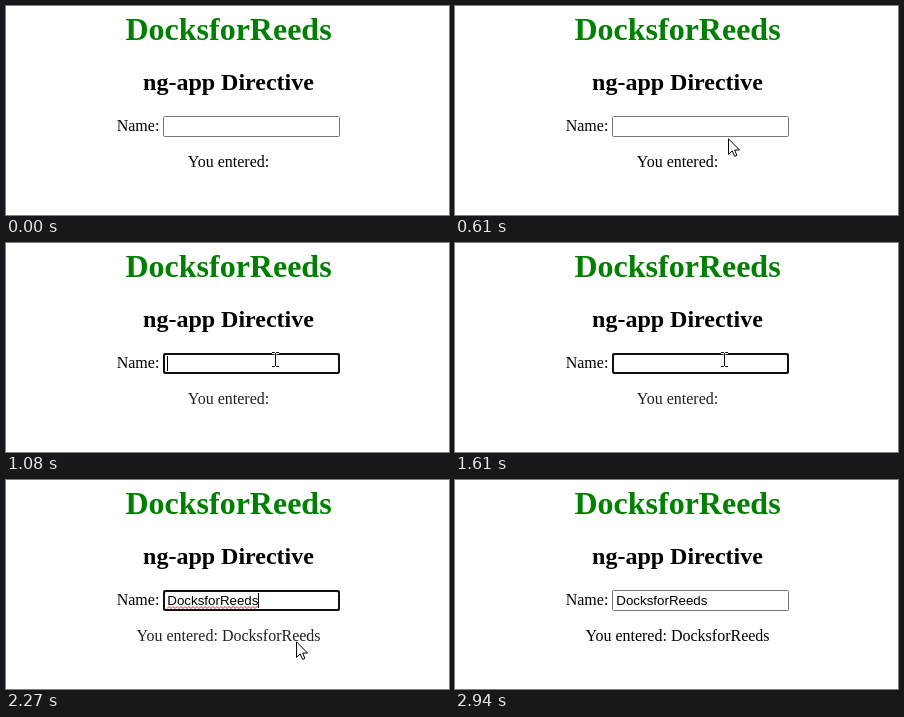
Write an HTML page that moves like this. It is 443 px wide and 209 px high and loops after 3000 ms.

```html
<!DOCTYPE html>
<html lang="en">
<head>
<meta charset="utf-8">
<title>ng-app Directive</title>
<style>
  html, body { margin: 0; width: 100%; height: 100%; overflow: hidden; background: #fff; }
  svg { display: block; width: 443px; height: 209px; font: 16px "Liberation Serif", "Times New Roman", serif; }
  .mid { text-anchor: middle; }
  .h1 { font-size: 32px; font-weight: bold; fill: #008000; }
  .h2 { font-size: 24px; font-weight: bold; }
  .value { font: 13.333px "Liberation Sans", Arial, sans-serif; }

  .anim { animation: 3s step-end infinite; }
  .border { animation-name: border; }
  .ring { animation-name: ring; }
  .result { animation-name: result; }
  .empty { animation-name: empty; }
  .typed { animation-name: typed; }
  .squiggle { animation-name: squiggle; }
  .caret { animation-name: caret; }
  .arrow { animation-name: arrow; }
  .beam { animation-name: beam; }

  @keyframes border { 0%, 98% { stroke: #767676 } 22.66% { stroke: #444 } }
  @keyframes ring { 0%, 98% { opacity: 0 } 36% { opacity: 1 } }
  @keyframes result { 0%, 98% { fill: #000 } 36% { fill: #222 } }
  @keyframes empty { 0% { opacity: 1 } 64.66% { opacity: 0 } }
  @keyframes typed { 0% { opacity: 0 } 64.66%, 100% { opacity: 1 } }
  @keyframes squiggle { 0%, 98% { opacity: 0 } 64.66% { opacity: 1 } }
  @keyframes caret {
    0%, 53.66%, 82.33% { opacity: 0; transform: none }
    36% { opacity: 1; transform: none }
    64.66% { opacity: 1; transform: translate(91px, 0) }
  }
  @keyframes arrow {
    0%, 22.66%, 82.33% { transform: translate(-50px, 0) }
    4.33% { transform: translate(329px, 203px) }
    6.66% { transform: translate(317px, 185px) }
    9% { transform: translate(305px, 170px) }
    11.33% { transform: translate(295px, 157px) }
    13.66% { transform: translate(287px, 146px) }
    15.66% { transform: translate(281px, 139px) }
    18% { transform: translate(276px, 134px) }
    20.33% { transform: translate(273px, 132px) }
    71.33% { transform: translate(276px, 135px) }
    73.33% { transform: translate(283px, 148px) }
    75.66% { transform: translate(290px, 161px) }
    78% { transform: translate(297px, 174px) }
    80% { transform: translate(304px, 185px) }
  }
  @keyframes beam {
    0%, 71.33% { transform: translate(-50px, 0) }
    22.66% { transform: translate(271px, 120px) }
    24.66% { transform: translate(269px, 116px) }
    69% { transform: translate(271px, 122px) }
  }
</style>
</head>
<body>
<svg viewBox="0 0 443 209">
  <defs>
    <pattern id="wave" x="161" y="126" width="4" height="3" patternUnits="userSpaceOnUse">
      <path d="M-1 1.5L0 2.5L2 .5L4 2.5L5 1.5" fill="none" stroke="#f00" stroke-width=".9"/>
    </pattern>
    <path id="ibeam" d="M-3 -6.5H-.5L.5 -5.5L1.5 -6.5H4M.5 -6V7M-3 7.5H-.5L.5 6.5L1.5 7.5H4" fill="none"/>
  </defs>

  <text class="mid h1" x="222.5" y="34">DocksforReeds</text>
  <text class="mid h2" x="222.5" y="84">ng-app Directive</text>
  <text x="110.7" y="125">Name:</text>

  <rect class="anim border" x="157.5" y="110.5" width="176" height="20" rx="1" fill="#fff"/>
  <rect class="anim ring" x="158" y="111" width="175" height="19" rx="2" fill="none" stroke="#101010" stroke-width="2"/>
  <text class="value anim typed" x="161.3" y="125">DocksforReeds</text>
  <rect class="anim squiggle" x="161" y="126" width="91" height="3" fill="url(#wave)"/>
  <rect class="anim caret" x="161" y="113" width="1" height="15"/>

  <g class="mid anim result">
    <text class="anim empty" x="222.5" y="161">You entered:</text>
    <text class="anim typed" x="222.5" y="161">You entered: DocksforReeds</text>
  </g>

  <g class="anim beam">
    <use href="#ibeam" stroke="#fff" stroke-width="3"/>
    <use href="#ibeam" stroke="#000"/>
  </g>
  <path class="anim arrow" d="M.5 .8V16.4L4.2 12.9L6.6 18.4L8.9 17.4L6.6 12H11.5Z" fill="#fff" stroke="#000"/>
</svg>
</body>
</html>
```
